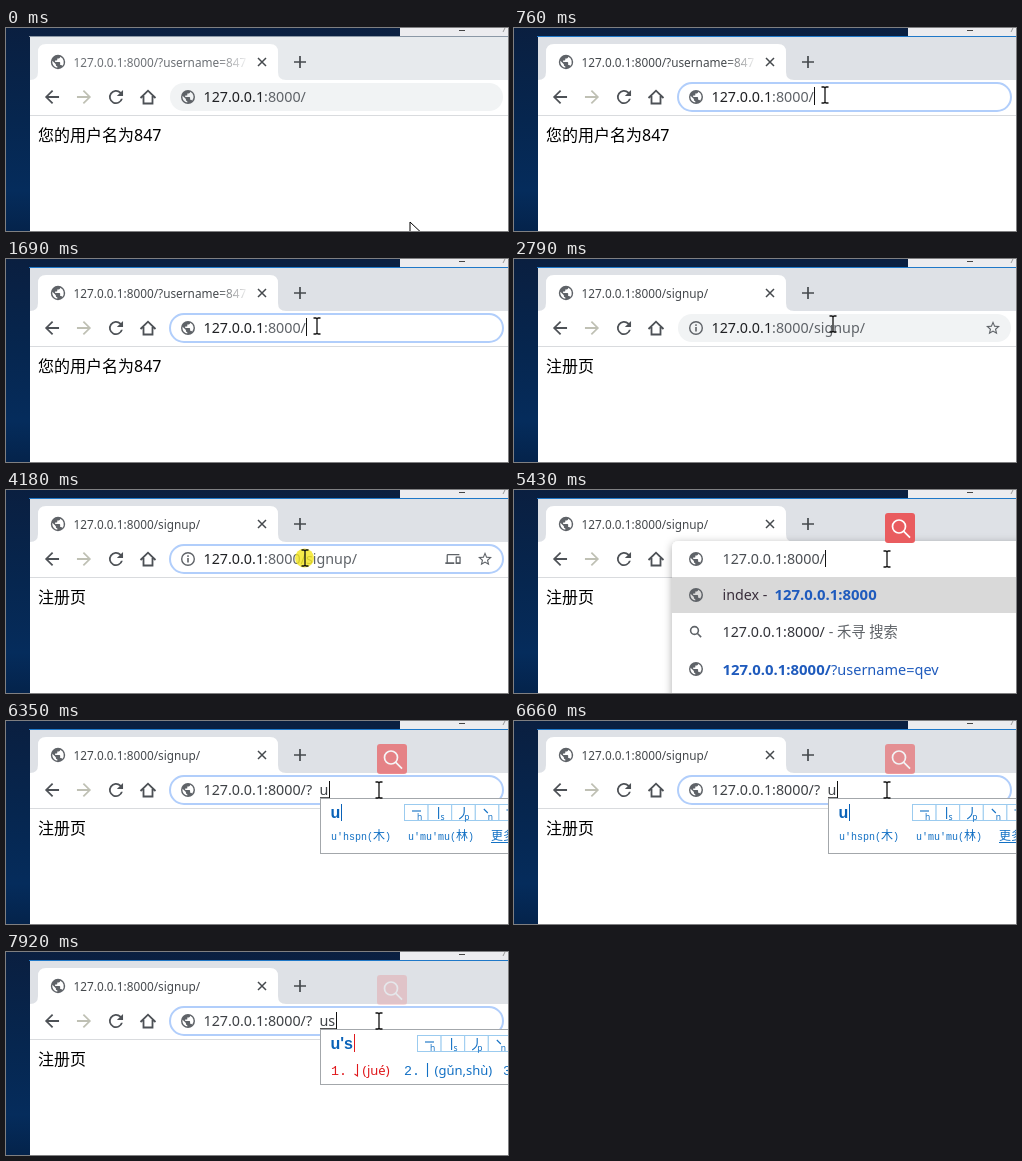
An HTML page for the animation above (8000 ms loop, 502 by 203 pixels).

```html
<!DOCTYPE html>
<html lang="zh">
<head>
<meta charset="utf-8">
<title>Address bar</title>
<style>
html, body { margin: 0; width: 100%; height: 100%; overflow: hidden; background: #fff; }
svg { display: block; width: 100vw; height: 100vh; }
text { font-family: "Noto Sans", "Noto Sans CJK SC", "Noto Sans CJK", sans-serif; white-space: pre; }
.b { font-weight: 700; }
.m { font-family: "Liberation Mono", "Noto Sans CJK SC", "Noto Sans CJK", monospace; }
.a { font-family: "Liberation Sans", Arial, sans-serif; font-weight: 700; }
</style>
</head>
<body>
<svg id="stage" viewBox="0 0 502 203" preserveAspectRatio="none">
  <defs>
    <linearGradient id="desk" x1="0" y1="0" x2="0" y2="1">
      <stop offset="0" stop-color="#0a1f40"/><stop offset=".45" stop-color="#06264f"/>
      <stop offset=".8" stop-color="#052c5c"/><stop offset="1" stop-color="#04234b"/>
    </linearGradient>
    <linearGradient id="fade">
      <stop offset="0" stop-color="#fff" stop-opacity="0"/><stop offset="1" stop-color="#fff"/>
    </linearGradient>
    <filter id="shade" x="-10%" y="-10%" width="120%" height="130%">
      <feDropShadow dx="0" dy="2" stdDeviation="4" flood-opacity=".33"/>
    </filter>
  </defs>
  <g id="view"></g>
</svg>
<script>
const LOOP = 8000;
const HOST = "127.0.0.1", PORT = ":8000/";
const GREY = "#5f6368", DARK = "#202124", BLUE = "#1f5bbd", IME = "#1270c4", RED = "#e0181c";
const view = document.getElementById("view");

const icons = {
  back: "M20 11H7.83l5.59-5.59L12 4l-8 8 8 8 1.41-1.41L7.83 13H20z",
  reload: "M17.65 6.35A8 8 0 1 0 19.73 14h-2.08A6 6 0 1 1 16.22 7.78L13 11h7V4z",
  globe: "M12 2a10 10 0 1 0 0 20 10 10 0 0 0 0-20zm-1 17.93A8 8 0 0 1 4.21 10.21L9 15v1a2 2 0 0 0 2 2zm6.9-2.54A2 2 0 0 0 16 16h-1v-3a1 1 0 0 0-1-1H8v-2h2a1 1 0 0 0 1-1V7h2a2 2 0 0 0 2-2v-.41a8 8 0 0 1 2.9 12.8z",
  star: "M22 9.24l-7.19-.62L12 2 9.19 8.63 2 9.24l5.46 4.73L5.82 21 12 17.27 18.18 21l-1.63-7.03zM12 15.4l-3.76 2.27 1-4.28-3.32-2.88 4.38-.38L12 6.1l1.71 4.04 4.38.38-3.32 2.88 1 4.28z",
  devices: "M4 6h18V4H4a2 2 0 0 0-2 2v11H0v3h14v-3H4zm19 2h-6a1 1 0 0 0-1 1v10a1 1 0 0 0 1 1h6a1 1 0 0 0 1-1V9a1 1 0 0 0-1-1zm-1 9h-4v-7h4z"
};

// Pointer stops: time, x, y
const pointer = [
  [0, 404, 194], [140, 384, 150], [290, 352, 104], [440, 322, 70], [610, 311, 67],
  [2790, 319, 65], [2940, 333, 63], [3090, 343, 62], [3250, 336, 62], [3400, 322, 63],
  [3550, 311, 64], [3700, 306, 64], [3850, 300, 67], [4180, 299, 68],
  [4330, 318, 68], [4480, 348, 69], [4640, 370, 69], [4800, 373, 69]
];
const fadeSteps = [5430, 5730, 5880, 6350, 6500, 6660, 6820, 6980, 7920];

const rect = (x, y, w, h, fill, more = "") =>
  `<rect x="${x}" y="${y}" width="${w}" height="${h}" fill="${fill}" ${more}/>`;
const line = (d, color, w = 1) =>
  `<path d="${d}" fill="none" stroke="${color}" stroke-width="${w}"/>`;
const text = (x, y, size, fill, s, cls = "") =>
  `<text x="${x}" y="${y}" font-size="${size}" fill="${fill}" class="${cls}">${s}</text>`;
const span = (fill, s) => `<tspan fill="${fill}">${s}</tspan>`;
const icon = (name, x, y, k, fill = GREY) =>
  `<path d="${icons[name]}" fill="${fill}" transform="translate(${x} ${y}) scale(${k}) translate(-12 -12)"/>`;
const lens = (x, y, r, color, w) =>
  `<circle cx="${x}" cy="${y}" r="${r}" fill="none" stroke="${color}" stroke-width="${w}"/>` +
  line(`M${x + r * .7} ${y + r * .7}l${r} ${r}`, color, w);
const caret = (x, y = 60, h = 17, color = "#111") => rect(x, y, 1, h, color);

function desktop(active) {
  return rect(0, 0, 502, 203, "url(#desk)") +
    rect(394, 0, 108, 8, "#ececef") + rect(453, 2, 6, 1, "#444") + line("M497 4l2-4", "#999") +
    rect(23, 8, 479, 1, active ? "#1f78c8" : "#8b98a6") +
    rect(24, 9, 478, 194, active ? "#dee1e6" : "#e7eaed") +
    rect(24, 52, 478, 151, "#fff");
}

function tab(signup, active) {
  const title = HOST + PORT + (signup ? "signup/" : "?username=847");
  return `<path d="M24 52q8 0 8-8V24q0-8 8-8h224q8 0 8 8v20q0 8 8 8z" fill="#fff"/>` +
    icon("globe", 52, 34, .72) +
    text(67.5, 38.5, 11.8, active ? "#45494d" : "#6c7075", title) +
    (signup ? "" : rect(212, 22, 31, 24, "url(#fade)") + rect(243, 22, 28, 24, "#fff")) +
    line("M252 30l8 8m0-8l-8 8", "#45494d", 1.5) +
    line("M288 34h12m-6-6v12", "#45494d", 1.7);
}

function toolbar() {
  return icon("back", 46, 69, .88, "#4d5156") +
    `<g transform="rotate(180 78 69)">${icon("back", 78, 69, .88, "#bfc0b4")}</g>` +
    icon("reload", 110, 69, .88, "#4d5156") +
    line("M134.5 70l7.5-7.3 7.5 7.3M137.5 68v7.5h9V68", "#4d5156", 1.8) +
    rect(24, 87, 478, 1, "#d9dbde");
}

function omnibox(t) {
  const signup = t >= 2010, edited = t >= 5260;
  const focus = (t >= 610 && t < 2010) || t >= 4000;
  const x = 197.5, size = 14.3;
  let s = focus
    ? rect(164, 55, 333, 28, "#fff", `rx="14" stroke="#b1cefb" stroke-width="2"`)
    : rect(164, 55, 333, 28, "#f1f3f4", `rx="14"`);
  if (signup && !edited) {
    s += `<circle cx="182" cy="69" r="6.3" fill="none" stroke="${GREY}" stroke-width="1.4"/>` +
      rect(181.2, 68, 1.6, 4.5, GREY) + rect(181.2, 65.3, 1.6, 1.6, GREY) + icon("star", 479, 69, .7);
    if (focus) s += icon("devices", 447, 69, .64);
  } else s += icon("globe", 182, 69, .7);

  if (edited) {
    s += text(x, 74, size, "#3f4246", HOST + PORT + "?");
    const typed = t < 6980 ? "u" : t >= 7300 && t < 7920 ? "use" : "us";
    const end = [323, 330, 338][typed.length - 1];
    s += text(313.4, 74, size, "#3f4246", typed) + rect(314, 76, end - 314, 1, "#555") + caret(end);
  } else {
    s += text(x, 74, size, GREY, span(DARK, HOST) + PORT + (signup ? "signup/" : ""));
    if (signup && t >= 4330) {
      const w = t < 4480 ? 18 : t < 4640 ? 46 : 51;
      s += `<clipPath id="pick">${rect(300, 60, w, 18, "#000")}</clipPath>` +
        `<g clip-path="url(#pick)">${rect(300, 60, w, 18, "#0078d7")}` +
        text(x, 74, size, "#fff", HOST + PORT + "signup/") + "</g>";
    }
    if (!signup && focus && (t < 1210 || t >= 1690)) s += caret(300, 59, 18);
  }
  return s;
}

function dropdown(asked) {
  const url = HOST + PORT + (asked ? "?" : "");
  const size = 14.3, x = 208.5;
  let s = rect(158, 51, 360, asked ? 110 : 170, "#fff", `rx="6" filter="url(#shade)"`) +
    rect(158, 87, 344, 36, "#d9d9d9") +
    icon("globe", 182, 69, .7) + icon("globe", 182, 105, .7) + lens(180.5, 140.5, 3.9, GREY, 1.6) +
    text(x, 74, size, "#4b4f54", url) + caret(asked ? 325 : 311) +
    text(x, 147, size, "#33343a", url + span(GREY, " - 禾寻 搜索"));
  if (asked) return s + text(x, 110, size, BLUE, url, "b");
  return s + text(x, 110, size, "#3a2f3c", "index - ") +
    text(260.5, 110, 14.9, BLUE, HOST + ":8000", "b") +
    icon("globe", 182, 179, .7) +
    text(x, 185, 14.9, BLUE, HOST + PORT, "b") + text(317, 185, 14.5, BLUE, "?username=qev");
}

function strokeKeys(x) {
  const shapes = ["M0 4h9", "M3 0v12", "M5 0v5q0 4-5 7", "M1 2l4 4", "M0 3h9l-2 3"];
  return shapes.map((d, i) => {
    const left = x + i * 23.6;
    return rect(left + .5, 83.5, 23.6, 16, "#fff", `stroke="#9bcbef"`) +
      `<g transform="translate(${left + 8} 86)">${line(d, IME, 1.1)}</g>` +
      text(left + 13, 99, 8.5, IME, "hspnz"[i]);
  }).join("");
}

function candidates(t) {
  let s = rect(314.5, 77.5, 200, 55, "#fff", `stroke="#a3a7ab"`);
  const cjk = c => `<tspan font-size="12">${c}</tspan>`;
  if (t < 6980) {
    return s + text(324.5, 97, 16, "#0a62b8", "u", "a") + caret(335, 83, 17, "#0a62b8") + strokeKeys(398) +
      text(325, 119, 10, IME, `u'hspn(${cjk("木")})`, "m") +
      text(402, 119, 10, IME, `u'mu'mu(${cjk("林")})`, "m") +
      text(485, 119, 12, IME, "更多", "m") + rect(485, 121, 24, 1, IME);
  }
  const longer = t >= 7300 && t < 7920;
  const label = (x, fill, c) => text(x, 122.8, 13.3, fill, c, "m");
  const word = (x, fill, c) => text(x, 122.8, 13, fill, c);
  s += text(324.5, 97, 16, "#0a62b8", longer ? "u'se" : "u's", "a") +
    caret(longer ? 357 : 348, 82, 18, RED) + strokeKeys(longer ? 420 : 411) +
    label(325, RED, "1.") + label(398, IME, "2.");
  if (longer)
    return s + word(341, RED, "涩(sè)") + word(415, IME, "铯(sè)") + label(472, IME, "3.");
  return s + line("M351.5 112v12l-3-2", RED, 1.1) + word(356.5, RED, "(jué)") +
    line("M421.5 111v14", IME, 1.1) + word(428.5, IME, "(gǔn,shù)") + label(497, IME, "3.");
}

function searchBadge(t) {
  const step = fadeSteps.filter(f => f <= t).pop() || 5430;
  return `<g opacity="${1 - (step - 5430) * .000315}">` + rect(371, 23, 30, 30, "#e95c5f", `rx="3"`) +
    lens(385, 36.5, 6.5, "#fff", 1.7) + "</g>";
}

function cursor(t) {
  const [, x, y] = pointer.filter(p => p[0] <= t).pop();
  const pressed = t >= 4000 && t < 4640;
  const shape = t < 440
    ? `<path d="M0 0v16l4-3.7 2.6 6 2.6-1.1L6.6 11.3H12z" fill="#fff" stroke="#000"/>`
    : line("M-3.5-8h2.5l1 1 1-1h2.5M0-7V7M-3.5 8h2.5l1-1 1 1h2.5", "#111", 1.3);
  return (pressed ? `<circle cx="${x - .5}" cy="${y}" r="9.5" fill="#f2e51c" opacity=".8"/>` : "") +
    `<g transform="translate(${x} ${y})">${shape}</g>`;
}

function draw(t) {
  const signup = t >= 2010, active = t >= 610;
  const open = t >= 5260 && t < 6350;
  return desktop(active) + tab(signup, active) + toolbar() +
    text(32, 113, 16, "#000", signup ? "注册页" : "您的用户名为847") +
    (open ? dropdown(t >= 5730) : omnibox(t)) +
    (t >= 6350 ? candidates(t) : "") +
    (t >= 4640 ? searchBadge(t) : "") + cursor(t);
}

let shown = "";
function tick(now) {
  const next = draw(now % LOOP);
  if (next !== shown) view.innerHTML = shown = next;
  requestAnimationFrame(tick);
}
tick(0);
</script>
</body>
</html>
```
